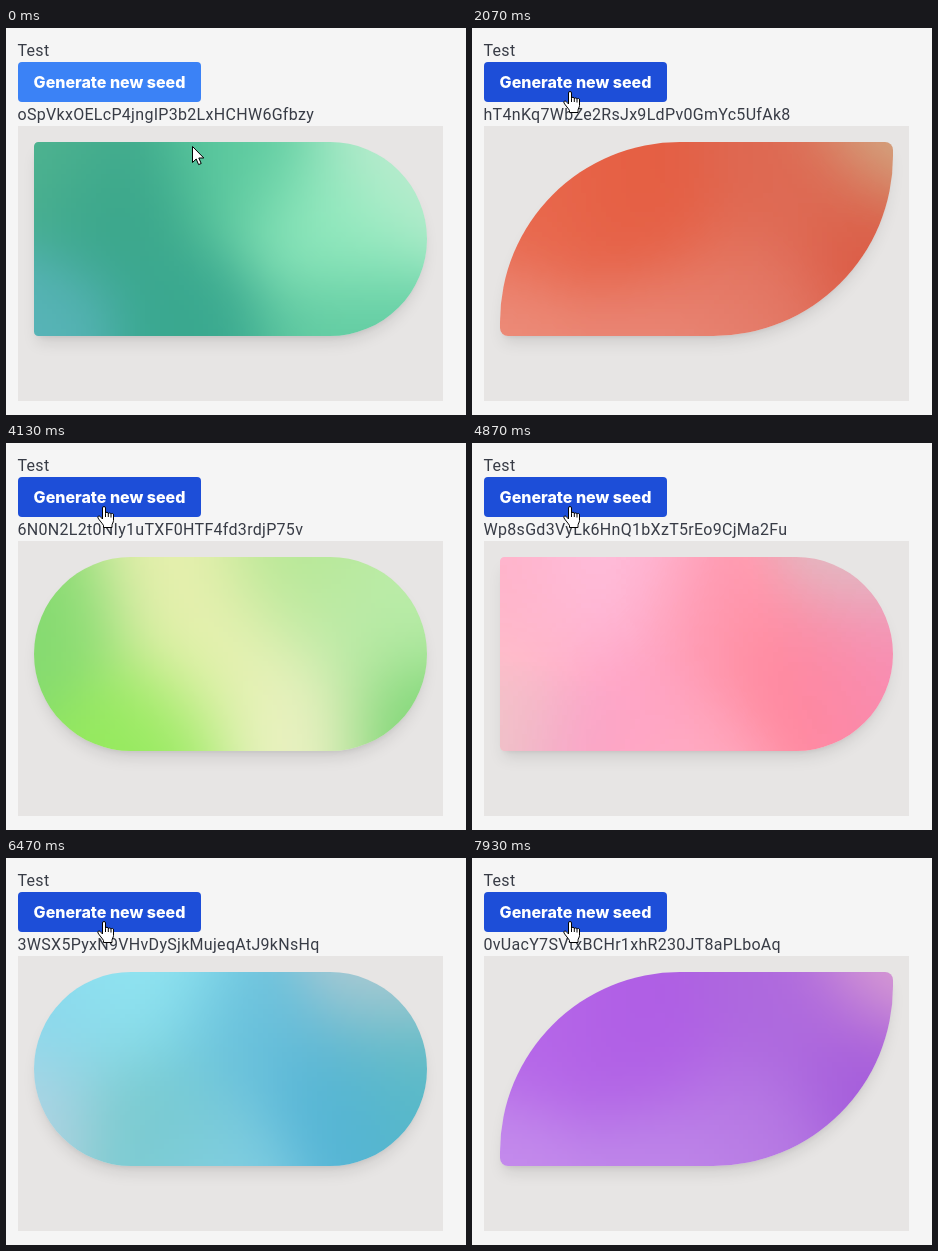
An HTML page with a canvas that plays this animation: 460 by 387 pixels, repeating every 8 s.

```html
<!DOCTYPE html>
<html lang="en">
<head>
<meta charset="utf-8">
<title>Seeded gradients</title>
<style>
  html, body { margin: 0; width: 100%; height: 100%; overflow: hidden; background: #f5f5f5; }
  #panel { position: absolute; left: 12px; top: 98px; width: 425px; height: 275px; background: #e7e5e4; }
  canvas {
    position: absolute; left: 16px; top: 16px; width: 393px; height: 194px;
    box-shadow: 0 10px 15px -3px rgb(0 0 0 / .1), 0 4px 6px -4px rgb(0 0 0 / .1);
  }
  svg { position: absolute; left: 0; top: 0; }
  text { font: 16px Roboto, sans-serif; letter-spacing: .3px; fill: #383c46; }
  #label { font: 800 16px Inter, sans-serif; letter-spacing: 0; fill: #fff; text-anchor: middle; }
  .cursor path { fill: #fff; stroke: #000; stroke-linejoin: round; }
</style>
</head>
<body>
<div id="panel"><canvas id="card" width="80" height="40"></canvas></div>
<svg width="460" height="387">
  <text x="11.5" y="28">Test</text>
  <rect id="button" x="12" y="34" width="183" height="40" rx="4"/>
  <text id="label" x="103.5" y="60">Generate new seed</text>
  <text id="seed" x="11.5" y="92"></text>
  <g id="arrow" class="cursor">
    <path d="M.5 .5V16.5L4.2 13L6.6 18.6L9.2 17.5L6.8 12H11.8Z"/>
  </g>
  <g id="hand" class="cursor">
    <path d="M5.5 13V2a1.5 1.5 0 0 1 3 0V7.5a1.4 1.4 0 0 1 2.8 .3a1.4 1.4 0 0 1 2.7 .5a1.3 1.3 0 0 1 2.5 .7V14.5c0 2-1.5 3-1.5 5V21.5H6.5V19.5C5.5 17.5 2.5 14.5 1 12c-.8-1.7 1-2.7 2.2-1.5z"/>
    <path d="M8.5 7.5V11M11.3 7.8V11M14 8.3V11.5"/>
  </g>
</svg>
<script>
const LOOP = 8000;
const $ = id => document.getElementById(id);
const card = $('card'), ctx = card.getContext('2d');
const image = ctx.createImageData(card.width, card.height);

// Colour points: x and y as fractions of the card, then the colour.
const green = [[0, 0, '#50b490'], [.2, .35, '#39a58a'], [.42, .95, '#38a78e'], [0, 1, '#58b4b8'],
  [.52, .1, '#5bc99e'], [.76, .45, '#98eec2'], [.95, .03, '#bcebcf'], [.76, 1, '#60cba1']];
const violet = [[.03, .2, '#8d82ea'], [.25, .35, '#8378e8'], [.2, .95, '#8478ea'], [.46, .62, '#aba2ef'],
  [.42, 0, '#867be9'], [.7, .3, '#a99fed'], [1, .7, '#bfbbdf'], [.66, 1.05, '#8580e2']];
const indigo = [[.05, .08, '#4545d4'], [.36, .1, '#4747d8'], [.72, .25, '#5b5bc8'], [1, 0, '#7787b8'],
  [0, .85, '#e6e4e3'], [.25, .8, '#dcdae3'], [.52, 1, '#cac6fb'], [.95, .5, '#5959c6'], [.95, 1.05, '#c4c0f3']];
const lime = [[.05, .3, '#84da70'], [.3, .9, '#94ea5c'], [.34, .1, '#eaf0b0'], [.5, .5, '#eef2b6'],
  [.66, .88, '#f0f2c8'], [.66, 0, '#b4e690'], [.8, .3, '#bcebaa'], [1, .25, '#bdeeac'], [.97, .85, '#78d470']];
const amber = [[0, 0, '#e8deb4'], [.15, .2, '#dcc88c'], [.06, .7, '#e2b368'], [.48, .25, '#deb267'],
  [.8, .08, '#e09857'], [.95, .72, '#eed6d6'], [.7, .85, '#efd0b8'], [.36, .9, '#eacb9c']];
const aqua = [[.05, .2, '#88d8ec'], [.28, .12, '#94e8f3'], [0, .75, '#b6d4e4'], [.28, .8, '#74c8c8'],
  [.52, .3, '#67bfdb'], [.46, 1, '#84d0e4'], [.78, .65, '#53b3d7'], [.95, .5, '#58bbc2'], [.92, .02, '#b4ccd4']];
const purple = [[.36, .4, '#af5de5'], [.1, .35, '#b566e8'], [0, 1, '#c48cec'], [.4, 1.05, '#c08aea'],
  [.66, .8, '#b87ce4'], [.72, .2, '#ad68de'], [.93, .55, '#a35adb'], [1.03, -.05, '#dca0d2']];

const pill = '180px', square = '8px', tab = '8px 180px 180px 8px', leaf = '180px 8px';
const scenes = [
  { at: 0, seed: 'oSpVkxOELcP4jngIP3b2LxHCHW6Gfbzy', points: green, radius: tab },
  { at: 800, seed: 'NrD3HX8L0zj2xRw2XuJFkG5pkdj6S4Cq', points: violet, radius: pill },
  { at: 1900, seed: 'hT4nKq7WbZe2RsJx9LdPv0GmYc5UfAk8', points: purple, radius: leaf, hue: 90 },
  { at: 2750, seed: 'mXJ1ZTj3Yos9YfhepmkdAsq8LgwsKXFX', points: indigo, radius: square },
  { at: 3600, seed: '6N0N2L2t0NIy1uTXF0HTF4fd3rdjP75v', points: lime, radius: pill },
  { at: 4460, seed: 'Wp8sGd3VyLk6HnQ1bXzT5rEo9CjMa2Fu', points: aqua, radius: tab, hue: 150 },
  { at: 5310, seed: 'DxttnItgwVhNDHt81GYDp3oroZbwRgO8', points: amber, radius: tab },
  { at: 6165, seed: '3WSX5PyxN9VHvDySjkMujeqAtJ9kNsHq', points: aqua, radius: pill },
  { at: 7020, seed: 'kE5vBz9RtXn1JqL7cHy3PwSa6DgUm0Zf', points: violet, radius: square, hue: 60 },
  { at: 7870, seed: '0vUacY7SVtxBCHr1xhR230JT8aPLboAq', points: purple, radius: leaf }
];

const rgb = hex => [1, 3, 5].map(i => parseInt(hex.slice(i, i + 2), 16));

// Blends the points by distance while they drift slowly.
function paintGradient(points, t) {
  const { width, height, data } = image;
  const moving = points.map(([x, y, color], i) => ({
    x: x + .012 * Math.sin(t / 900 + i * 2),
    y: y + .025 * Math.cos(t / 1100 + i * 3),
    color: rgb(color)
  }));
  for (let row = 0, k = 0; row < height; row++) {
    for (let col = 0; col < width; col++, k += 4) {
      const u = (col + .5) / width, v = (row + .5) / height;
      let total = 0, r = 0, g = 0, b = 0;
      for (const p of moving) {
        const dx = (u - p.x) * 2, dy = v - p.y;
        const w = Math.exp(-(dx * dx + dy * dy) / .15);
        total += w;
        r += w * p.color[0];
        g += w * p.color[1];
        b += w * p.color[2];
      }
      data[k] = r / total;
      data[k + 1] = g / total;
      data[k + 2] = b / total;
      data[k + 3] = 255;
    }
  }
  ctx.putImageData(image, 0, 0);
}

function place(id, visible, x, y) {
  $(id).setAttribute('transform', `translate(${x} ${y})`);
  $(id).setAttribute('visibility', visible ? 'visible' : 'hidden');
}

function drawPointer(t) {
  const p = Math.min(1, Math.max(0, (t - 70) / 530));
  const ease = p * p * (3 - 2 * p);
  const x = 186 - 89 * ease, y = 118 - 55 * ease;
  const hover = y < 74;
  place('arrow', !hover, x, y);
  place('hand', hover, x - 6, y);
  $('button').setAttribute('fill', hover ? '#1d4ed8' : '#3b82f6');
}

function frame(now) {
  const t = now % LOOP;
  const scene = scenes.findLast(s => s.at <= t);
  $('seed').textContent = scene.seed;
  card.style.borderRadius = scene.radius;
  card.style.filter = scene.hue ? `hue-rotate(${scene.hue}deg)` : 'none';
  paintGradient(scene.points, t);
  drawPointer(t);
  requestAnimationFrame(frame);
}
frame(0);
</script>
</body>
</html>
```
